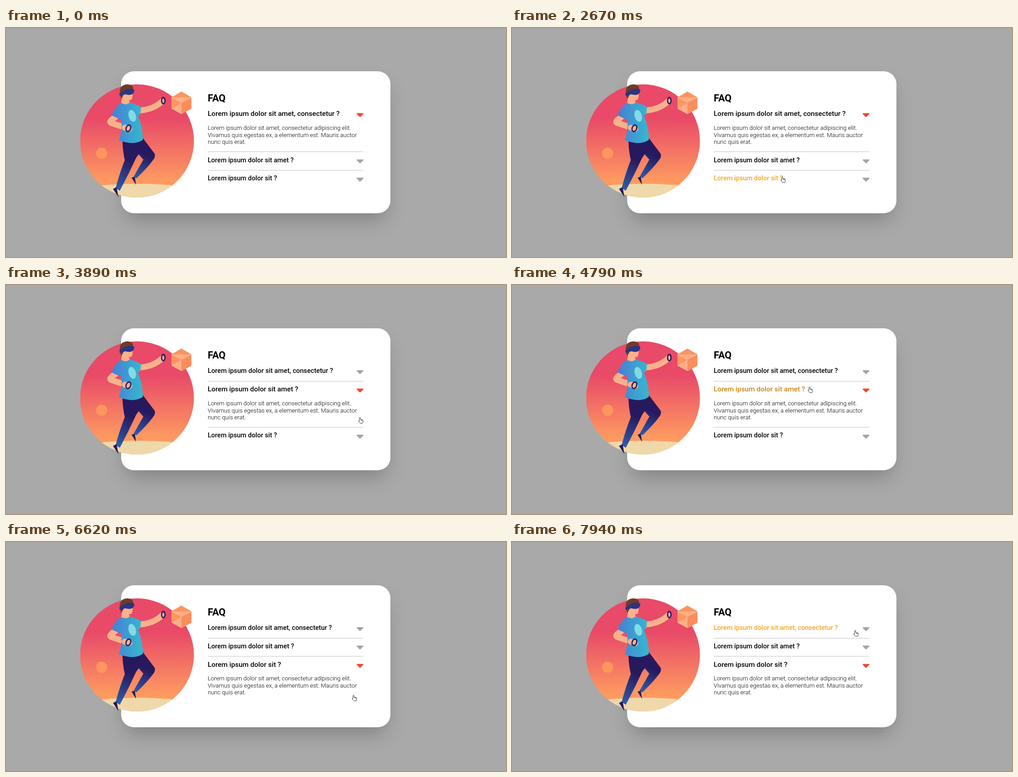
Recreate the animation shown at these times as an HTML page. Size 1103x508 px, loop 8000 ms.

```html
<!DOCTYPE html>
<html lang="en">
<head>
<meta charset="utf-8">
<title>FAQ accordion</title>
<style>
html, body { margin: 0; width: 100%; height: 100%; overflow: hidden; background: #a9a9a9; }
.card { position: absolute; left: 254px; top: 95.600px; width: 594px; height: 315px; border-radius: 28px;
  background: #fff; box-shadow: 0 23px 45px -11px rgba(0, 0, 0, .25); }
svg { position: absolute; left: 0; top: 0; }
text { font-family: Roboto, Arial, sans-serif; font-weight: 500; }
.title { font-size: 21.800px; font-weight: 700; }
.answer text { font-size: 13.080px; font-weight: 300; }
.skin { fill: #f9b18c; }
.limb { fill: none; stroke: #f9b18c; stroke-width: 13; stroke-linecap: round; stroke-linejoin: round; }
.ring { fill: none; stroke: #261b5e; stroke-width: 2.800; }
</style>
</head>
<body>
<div class="card"></div>
<svg width="1103" height="508" viewBox="0 0 1103 508">
  <defs>
    <linearGradient id="sky" x2="0" y2="1">
      <stop offset=".3" stop-color="#e84a68"/><stop offset=".85" stop-color="#fe9a60"/>
    </linearGradient>
    <linearGradient id="shirt">
      <stop offset=".1" stop-color="#4783d3"/><stop offset="1" stop-color="#35b8cf"/>
    </linearGradient>
    <linearGradient id="pants" x1=".3" x2="0" y2="1">
      <stop offset=".3" stop-color="#27195d"/><stop offset="1" stop-color="#3060b0"/>
    </linearGradient>
    <clipPath id="disc"><circle cx="289" cy="250.600" r="125.600"/></clipPath>
  </defs>

  <g clip-path="url(#disc)">
    <path fill="url(#sky)" d="M164 125H415V376H164z"/>
    <path fill="#efd8aa" d="M200 350Q290 341 380 350V380H200z"/>
    <circle cx="211" cy="278" r="12.500" fill="#fc955e"/>
  </g>

  <g transform="translate(387 166)">
    <path fill="#fdaf88" d="M0 -25L22 -12V13L0 25L-22 13V-12z"/>
    <path fill="#fb9560" d="M0 -25L22 -12H-22z"/>
    <path fill="#fd9660" d="M0 0L-22 -11V13z"/>
    <path fill="#fb8d5c" d="M0 0L22 -11V13L0 25z"/>
  </g>

  <g>
    <path fill="url(#pants)" d="M301 243L328 279Q330 286 325 292Q313 309 288 333L281 331L303 292L277 262z"/>
    <path fill="url(#pants)" d="M257 248L303 245Q303 268 287 288L271 322L251 361L242 355Q249 327 262 293Q257 270 257 248z"/>
    <path fill="#241a5c" d="M277 332L284 330L287 348zM236 357L244 353L248 375z"/>

    <path class="limb" d="M294 183Q325 181 344 163"/>
    <ellipse class="ring" cx="347" cy="161" rx="3.800" ry="7"/>
    <path class="skin" d="M258 143H279Q281 162 271 160L274 168Q264 174 254 167z"/>
    <path fill="#6d3c29" d="M254 157Q244 126 268 125Q282 126 280 135L264 139L257 153z"/>
    <path fill="#2b3482" d="M250 145L263 137Q284 131 283 140Q280 152 263 147L251 151z"/>

    <path class="limb" d="M241 198Q222 209 236 212L272 224"/>
    <path fill="url(#shirt)" d="M254 166Q264 173 273 165Q287 169 298 175L296 192L291 194Q302 221 302 248Q283 262 249 249Q256 231 255 204L233 194Q240 174 254 166z"/>
    <ellipse cx="278.500" cy="195" rx="8" ry="13.500" fill="#80dbe5" transform="rotate(-16 278.500 195)"/>
    <path class="limb" d="M262 221L272 224"/>
    <ellipse class="ring" cx="270" cy="222.500" rx="5" ry="7.500" transform="rotate(20 270 222.500)"/>
  </g>

  <text class="title" x="445" y="163">FAQ</text>
  <g id="rows"></g>
  <g class="answer" id="answer">
    <text x="445">Lorem ipsum dolor sit amet, consectetur adipiscing elit.</text>
    <text x="445" y="15.700">Vivamus quis egestas ex, a elementum est. Mauris auctor</text>
    <text x="445" y="31.400">nunc quis erat.</text>
  </g>
  <path id="hand" fill="#fff" stroke="#333" stroke-linejoin="round"
    d="M-1.200 1.500Q0 -.5 1.200 1.500V5.300L6 6.300Q8 7 5.700 13.700H.8L-3 9.400Q-3.200 7.200 -1.200 8.600zM3 6V8M5 6.300V8.200"/>
</svg>
<script>
const LOOP = 8000, SIZE_TIME = 450, COLOR_TIME = 250;
const ROW = 40.7, ANSWER = 61.7, TOP = 190.5, LEFT = 445;
const BLACK = [5, 2, 8], GREY = [165, 165, 165], HOVER = [250, 165, 25], RED = [240, 72, 45];

// when each row opens; it closes as the next one opens
const openings = [-LOOP, 3640, 6320, Infinity];

// pointer stops: time, x, y
const stops = [
  [190, 1074, 489], [1000, 612, 195], [1280, 590, 205], [1440, 576, 249.5],
  [2300, 596, 329], [2670, 596, 329], [3420, 781, 293], [3890, 781, 293],
  [4370, 705, 286], [5000, 632, 195], [5270, 632, 195], [5740, 700, 340],
  [6020, 784, 334], [6320, 784, 334], [6620, 767, 339], [7100, 615, 262],
  [7660, 606, 212], [7940, 757, 195.5]
];

const $ = id => document.getElementById(id);
function set(node, attrs) {
  for (const key in attrs) node.setAttribute(key, attrs[key]);
}
function add(tag, attrs) {
  const node = document.createElementNS("http://www.w3.org/2000/svg", tag);
  set(node, attrs);
  return $("rows").appendChild(node);
}

const ease = p => 1 - (1 - Math.min(1, Math.max(0, p))) ** 2.3;
const mix = (a, b, k) => `rgb(${a.map((v, i) => Math.round(v + (b[i] - v) * k))})`;

const rows = ["Lorem ipsum dolor sit amet, consectetur ?", "Lorem ipsum dolor sit amet ?", "Lorem ipsum dolor sit ?"]
  .map((text, i) => {
    const label = add("text", { x: LEFT });
    label.textContent = text;
    return {
      label,
      icon: add("path", { d: "M774.8 0H787.2L781 6.3z", "stroke-width": 2.4, "stroke-linejoin": "round" }),
      line: add("path", { d: "M445 0H788", stroke: i ? "#c2c2c2" : "none" })
    };
  });

const active = t => openings.findIndex(start => start > t) - 1;
const rowY = (i, t) => TOP + i * ROW + (i > active(t) ? ANSWER : 0);
const openness = (i, t, time) => ease((t - openings[i]) / time) - ease((t - openings[i + 1]) / time);

function pointer(t) {
  const next = stops.findIndex(stop => stop[0] > t);
  if (next === 0) return null;
  if (next < 0) return stops[stops.length - 1].slice(1);
  const [t0, x0, y0] = stops[next - 1], [t1, x1, y1] = stops[next];
  const k = (t - t0) / (t1 - t0);
  return [x0 + (x1 - x0) * k, y0 + (y1 - y0) * k];
}

function hovered(i, t) {
  const p = pointer(t);
  if (!p) return false;
  const dy = p[1] - rowY(i, t);
  return p[0] > LEFT && p[0] < 788 && dy > -18 && dy < ROW - 18;
}

// share of the last COLOR_TIME spent over the row, which fades its colour in and out
function glow(i, t) {
  const samples = 25;
  let hits = 0;
  for (let n = 0; n < samples; n++) hits += hovered(i, t - n * COLOR_TIME / samples);
  return hits / samples;
}

function draw(t) {
  rows.forEach(({ label, icon, line }, i) => {
    const y = rowY(i, t);
    const tint = mix(GREY, RED, openness(i, t, COLOR_TIME));
    set(label, {
      y: Math.round(y + 4.8),
      fill: mix(BLACK, HOVER, glow(i, t)),
      "font-size": 14.53 + .91 * openness(i, t, SIZE_TIME)
    });
    set(icon, { transform: `translate(0 ${y - .3})`, fill: tint, stroke: tint });
    set(line, { transform: `translate(0 ${Math.floor(y - 18) + .5})` });
  });
  set($("answer"), { transform: `translate(0 ${Math.round(rowY(active(t), t) + 35.3)})` });
  const p = pointer(t);
  set($("hand"), { visibility: p ? "visible" : "hidden", transform: `translate(${p || [0, 0]})` });
}

const start = performance.now();
function tick() {
  draw((performance.now() - start) % LOOP);
  requestAnimationFrame(tick);
}
tick();
</script>
</body>
</html>
```
